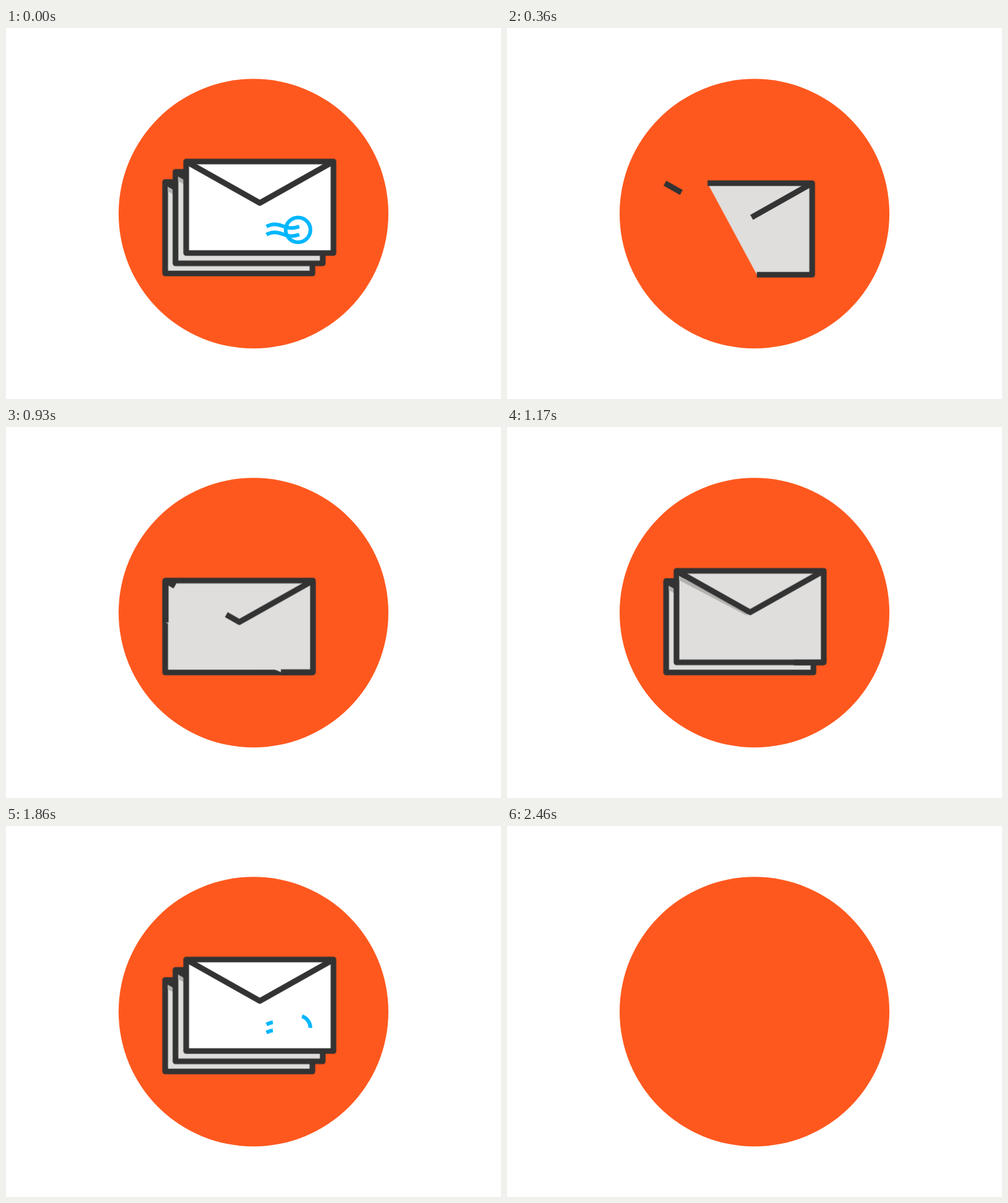
Animation, 800 px wide and 600 px high, one loop 2.52 s. Source, as an HTML page without scripts:

```html
<!DOCTYPE html>
<html lang="en">
<head>
<meta charset="utf-8">
<title>Envelopes</title>
<style>
  html, body { margin: 0; width: 100%; height: 100%; overflow: hidden; background: #fff; }
  svg { display: block; width: 800px; height: 600px; }

  .disc {
    fill: #ff581e;
    transform-origin: 400px 300.3px;
    animation: pulse 2.52s ease-in-out infinite;
  }
  .stack { animation: leave 2.52s linear infinite; }

  .first  { --draw: draw-first;  --slide: slide-first;  --paper: #dfdedc; }
  .second { --draw: draw-second; --slide: slide-second; --paper: #dfdedc; }
  .third  { --draw: draw-third;  --slide: slide-third;  --paper: #fff; }

  .slide { animation: var(--slide) 2.52s ease-in-out infinite; }
  .first .slide { animation: slide-first 2.52s linear infinite, appear 2.52s linear infinite; }

  .body, .flap, .shade { d: var(--p5); animation: var(--draw) 2.52s linear infinite; }
  .body, .flap { stroke: #333; stroke-width: 9.2; stroke-linejoin: round; }
  .flap { fill: none; }
  .shade { fill: #b3b1ae; }

  /* Stages of the trimmed outlines, from empty (p0) to whole (p5) */
  .body {
    fill: var(--paper);
    --p0: path("M238 148L238 148L238 148L238 148L238 148L238 148");
    --p1: path("M238 148L238 148L238 148L238 148L238 148L48 148");
    --p2: path("M238 0L238 0L238 0L238 0L238 148L91 148");
    --p3: path("M0 0L0 0L0 0L238 0L238 148L172 148");
    --p4: path("M0 148L0 148L0 0L238 0L238 148L203 148");
    --p5: path("M238 148L0 148L0 0L238 0L238 148L230 148");
  }
  .flap {
    --p0: path("M0 0L0 0M238 0L238 0L238 0");
    --p1: path("M0 0L59 33M238 0L238 0L238 0");
    --p2: path("M0 0L45 25M192 26L192 26L238 0");
    --p3: path("M0 0L19 11M119 67L119 67L238 0");
    --p4: path("M0 0L10 6M73 41L119 67L238 0");
    --p5: path("M0 0L0 0M0 0L119 67L238 0");
  }
  .shade {
    --p0: path("M119 67L119 67L119 67L119 67Z");
    --p1: var(--p0);
    --p2: var(--p0);
    --p3: var(--p0);
    --p4: path("M73 41L73 51L113 72L119 67Z");
    --p5: path("M4 2L4 15L113 72L119 67Z");
  }

  .stamp path {
    fill: none;
    stroke: #00b7ff;
    stroke-width: 6;
    stroke-dasharray: 1 2;
    animation: ink 2.52s linear infinite;
  }

  @keyframes pulse {
    0%, 1.19% { transform: scale(1); }
    4.2% { transform: scale(1.14); }
    7.9%, 100% { transform: scale(1); }
  }
  @keyframes leave {
    0%, 88.5% { opacity: 1; }
    96.8%, 100% { opacity: 0; }
  }
  @keyframes appear {
    0%, 1.19% { opacity: 1; }
    1.2%, 7.1% { opacity: 0; }
    13.1%, 100% { opacity: 1; }
  }

  @keyframes draw-first {
    0%, 1.19% { d: var(--p5); }
    1.2%, 5.75% { d: var(--p0); }
    8.33% { d: var(--p1); }
    10.95% { d: var(--p2); }
    15.7% { d: var(--p3); }
    18.7% { d: var(--p4); }
    27.3%, 100% { d: var(--p5); }
  }
  @keyframes draw-second {
    0%, 1.19% { d: var(--p5); }
    1.2%, 27.4% { d: var(--p0); }
    29.6% { d: var(--p1); }
    31.75% { d: var(--p2); }
    35.8% { d: var(--p3); }
    38.3% { d: var(--p4); }
    45.6%, 100% { d: var(--p5); }
  }
  @keyframes draw-third {
    0%, 1.19% { d: var(--p5); }
    1.2%, 45.6% { d: var(--p0); }
    49% { d: var(--p1); }
    52.4% { d: var(--p2); }
    58.6% { d: var(--p3); }
    62.5% { d: var(--p4); }
    73.8%, 100% { d: var(--p5); }
  }

  @keyframes slide-first {
    0%, 1.19% { transform: translate(0, 0); }
    1.2%, 5.75% { transform: translate(-17px, 17px); }
    8.33% { transform: translate(-9px, 9px); }
    16%, 100% { transform: translate(0, 0); }
  }
  @keyframes slide-second {
    0%, 1.19% { transform: translate(0, 0); }
    1.2%, 35% { transform: translate(-17px, 17px); }
    45.5%, 100% { transform: translate(0, 0); }
  }
  @keyframes slide-third {
    0%, 1.19% { transform: translate(0, 0); }
    1.2%, 56.4% { transform: translate(-17px, 17px); }
    69%, 100% { transform: translate(0, 0); }
  }

  @keyframes ink {
    0%, 1.19% { stroke-dashoffset: 0; }
    1.2%, 71.4% { stroke-dashoffset: 1.01; }
    83.3%, 100% { stroke-dashoffset: 0; }
  }
</style>
</head>
<body>
<svg viewBox="0 0 800 600">
  <circle class="disc" cx="400" cy="300.3" r="218"/>
  <g class="stack">
    <g class="first" transform="translate(257.2 249)">
      <g class="slide"><path class="body"/><path class="shade"/><path class="flap"/></g>
    </g>
    <g class="second" transform="translate(273.9 232.6)">
      <g class="slide"><path class="body"/><path class="shade"/><path class="flap"/></g>
    </g>
    <g class="third" transform="translate(291.2 215.9)">
      <g class="slide"><path class="body"/><path class="flap"/></g>
    </g>
    <g class="stamp">
      <path pathLength="1" d="M492 326.6A20 20 0 0 0 452 326.6A20 20 0 0 0 492 326.6"/>
      <path pathLength="1" d="M421 321C431 316 437 316.5 448 320.5S464 324.5 474 321"/>
      <path pathLength="1" d="M421 334C431 329 437 329.5 448 333.5S464 337.5 474 334"/>
    </g>
  </g>
</svg>
</body>
</html>
```
